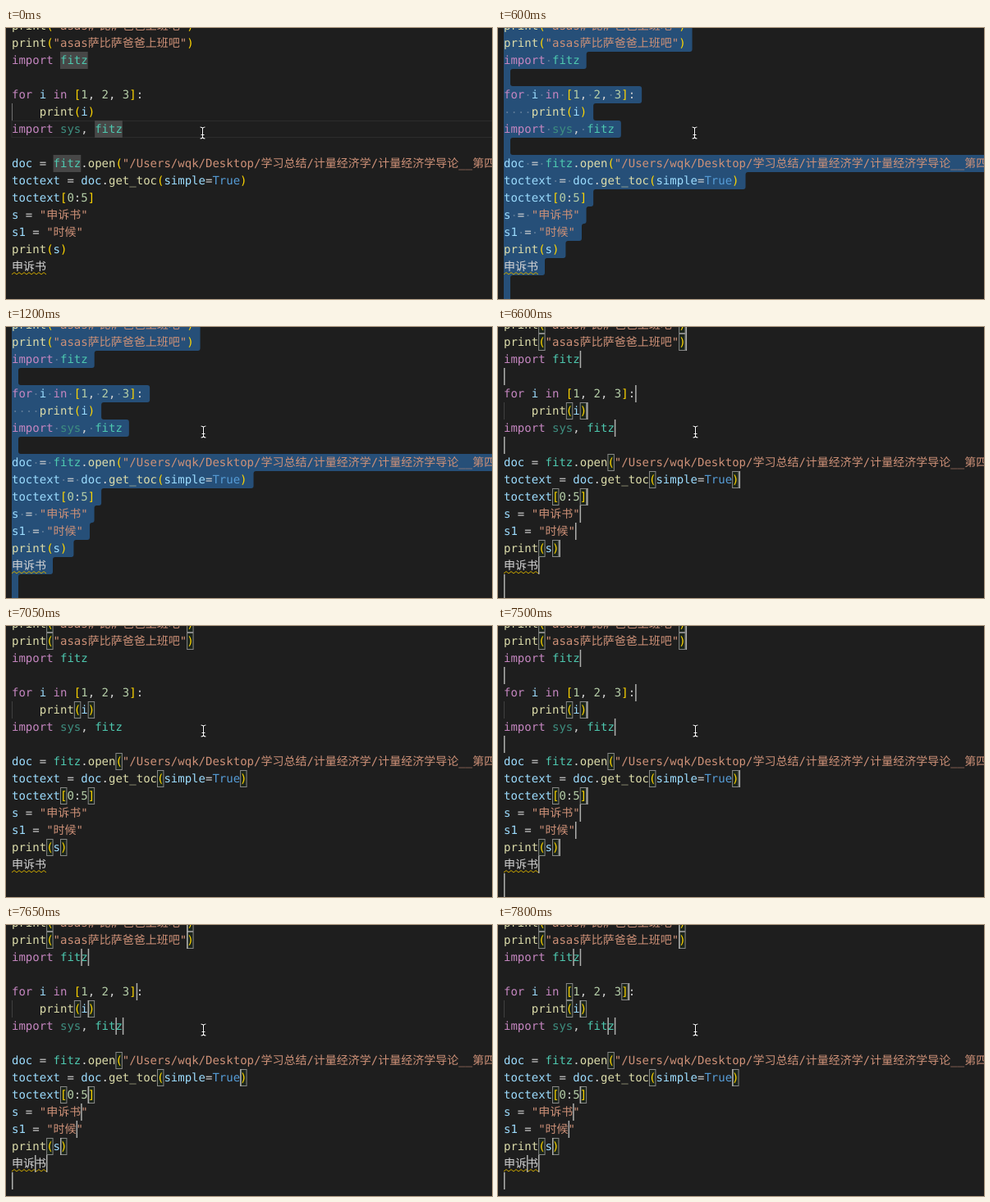
An HTML page for the animation above (8 s loop, 592 px wide and 331 px high).

```html
<!DOCTYPE html>
<html lang="zh-CN">
<head>
<meta charset="utf-8">
<style>
  html, body { margin: 0; width: 100%; height: 100%; overflow: hidden; background: #1e1e1e; }
  svg { display: block; }
  text {
    font: 14px "DejaVu Sans Mono", "Noto Sans CJK SC", "Noto Sans CJK", monospace;
    text-rendering: geometricPrecision;
    white-space: pre;
  }
</style>
</head>
<body>
<svg id="stage" width="592" height="331" viewBox="0 0 592 331"></svg>
<script>
const LOOP = 8000;
const LEFT = 7, TOP = -13, ROW = 21, CHAR = 8.428, WIDE = 14;

const lines = [
  'print("asas萨比萨爸爸上班吧")',
  'print("asas萨比萨爸爸上班吧")',
  'import fitz',
  '',
  'for i in [1, 2, 3]:',
  '    print(i)',
  'import sys, fitz',
  '',
  'doc = fitz.open("/Users/wqk/Desktop/学习总结/计量经济学/计量经济学导论__第四版.pdf")',
  'toctext = doc.get_toc(simple=True)',
  'toctext[0:5]',
  's = "申诉书"',
  's1 = "时候"',
  'print(s)',
  '申诉书',
  '',
  ''
];
const LIST_ROW = 4, INDENT_ROW = 5, CURRENT_ROW = 6, WARN_ROW = 14;

const rules = [
  ['"[^"]*"', '#ce9178'],
  ['\\b(?:import|for|in)\\b', '#c586c0'],
  ['\\b(?:print|open|get_toc)\\b', '#dcdcaa'],
  ['\\bfitz\\b', '#4ec9b0'],
  ['\\bsys\\b', '#3e8f80'],
  ['\\bTrue\\b', '#569cd6'],
  ['\\d+', '#b5cea8'],
  ['[()\\[\\]]', '#ffd700'],
  ['[a-z]\\w*', '#9cdcfe'],
  ['[^\\s\\w()\\[\\]"]+', '#d4d4d4']
];
const lexer = new RegExp(rules.map(([pattern]) => `(${pattern})`).join('|'), 'g');

const svg = document.getElementById('stage');

function add(parent, tag, attrs = {}, text = '') {
  const node = document.createElementNS('http://www.w3.org/2000/svg', tag);
  for (const key in attrs) node.setAttribute(key, attrs[key]);
  node.textContent = text;
  parent.appendChild(node);
  return node;
}
const group = () => add(svg, 'g');
const rect = (parent, x, y, width, height, attrs) =>
  add(parent, 'rect', { x, y, width, height, ...attrs });

const rowY = row => TOP + row * ROW;
const colX = (row, col) => [...lines[row].slice(0, col)]
  .reduce((x, ch) => x + (ch > '\u2e80' ? WIDE : CHAR), LEFT);
const endX = row => colX(row, lines[row].length);

function eachMatch(pattern, visit) {
  lines.forEach((line, row) => {
    for (const match of line.matchAll(pattern)) visit(row, match.index, match);
  });
}

// Layers, back to front
const currentLine = group(), selection = group(), matches = group(), guide = group();
const brackets = group(), listBrackets = group(), code = group(), dots = group();
const endCarets = group(), movedCarets = group(), pointer = group();

rect(currentLine, LEFT, rowY(CURRENT_ROW) + 0.5, 600, ROW - 1,
  { fill: 'none', stroke: '#2c2c2c' });

function selectionPath() {
  const edges = lines.map((_, row) => endX(row) + 8);
  const r = 3;
  let d = `M${LEFT} ${TOP}H${edges[0]}`;
  edges.forEach((x, row) => {
    const y = rowY(row + 1), next = edges[row + 1];
    const turn = Math.sign(next - x);
    d += turn
      ? `V${y - r}Q${x} ${y} ${x + r * turn} ${y}H${next - r * turn}Q${next} ${y} ${next} ${y + r}`
      : `V${y}`;
  });
  return d + `H${LEFT}Z`;
}
add(selection, 'path', { d: selectionPath(), fill: '#264f78' });

eachMatch(/\bfitz\b/g, (row, col) =>
  rect(matches, colX(row, col), rowY(row), 4 * CHAR, ROW, { fill: '#474747' }));

const indentGuide = rect(guide, LEFT, rowY(INDENT_ROW), 1, ROW);

eachMatch(/[()[\]]/g, (row, col) =>
  rect(row === LIST_ROW ? listBrackets : brackets,
    colX(row, col) + 0.5, rowY(row) + 0.5, CHAR - 1, ROW - 1,
    { fill: '#1c251c', stroke: '#888' }));

eachMatch(lexer, (row, col, match) => {
  const fill = rules[match.slice(1).findIndex(Boolean)][1];
  add(code, 'text', { x: colX(row, col), y: rowY(row) + 15, fill }, match[0]);
});

let wave = `M${LEFT} ${rowY(WARN_ROW) + 20}`;
for (let i = 0; i < 14; i++) wave += `l3 ${i % 2 ? 2.4 : -2.4}`;
add(code, 'path', { d: wave, fill: 'none', stroke: '#cca700' });

eachMatch(/ /g, (row, col) =>
  add(dots, 'circle', {
    cx: colX(row, col) + CHAR / 2, cy: rowY(row) + 11, r: 1, fill: '#e3e4e2', opacity: 0.32
  }));

const caret = (parent, row, x) => rect(parent, x, rowY(row), 1.5, ROW, { fill: '#aeafad' });
lines.forEach((line, row) => {
  caret(endCarets, row, endX(row));
  if (line) caret(movedCarets, row, colX(row, line.length - 1));
  else caret(movedCarets, row - 1, endX(row - 1));
});

const beam = 'M-3 -7Q0 -7 0 -5Q0 -7 3 -7M0 -5V5M-3 7Q0 7 0 5Q0 7 3 7M-2 2.5H2';
for (const [stroke, width] of [['#000', 2.6], ['#fff', 1.1]]) {
  add(pointer, 'path', { d: beam, fill: 'none', stroke, 'stroke-width': width });
}

function show(node, visible) {
  node.style.display = visible ? '' : 'none';
}

function render(t) {
  const idle = t < 600;
  const selected = t >= 600 && t < 6600;
  const multi = t >= 6600;
  const moved = t >= 7650;
  const blinkOff = t >= 7050 && t < 7500;

  show(currentLine, idle);
  show(matches, idle);
  show(selection, selected);
  show(dots, selected);
  show(guide, !selected);
  indentGuide.setAttribute('fill', idle ? '#707070' : '#404040');
  show(brackets, multi);
  show(listBrackets, t >= 7800);
  show(endCarets, multi && !moved && !blinkOff);
  show(movedCarets, moved);
  pointer.setAttribute('transform', `translate(${t < 1200 ? 239.5 : 240.5} 128)`);
}

const start = performance.now();
function tick() {
  render((performance.now() - start) % LOOP);
  requestAnimationFrame(tick);
}
render(0);
requestAnimationFrame(tick);
</script>
</body>
</html>
```
